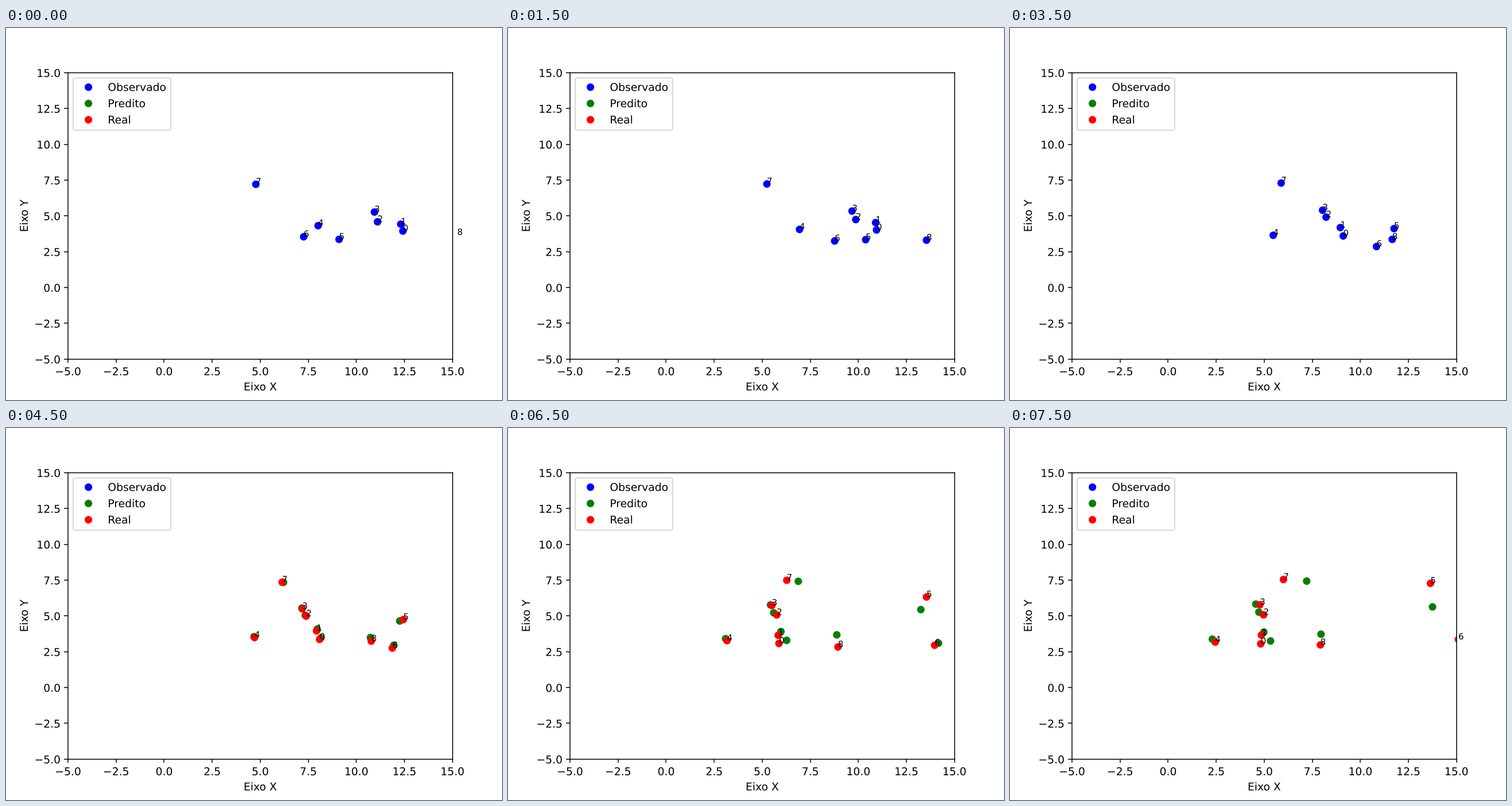
Recreate the animation shown at these times as a matplotlib script. Size 864 by 648 pixels, loop 8000 ms.

```python
import numpy as np
import matplotlib.pyplot as plt
from matplotlib.animation import FuncAnimation
from matplotlib.patheffects import Normal

# Drawing everything as paths keeps text and markers at sub-pixel positions.
plt.rcParams["path.effects"] = [Normal()]

FRAMES, INTERVAL = 16, 500
LAST_SEEN, LAST = 7, FRAMES - 1
KEY_TIMES = (0, 3, LAST_SEEN, 11, LAST)

# Per agent, in stage pixels: the walk at KEY_TIMES, then where the forecast ends.
AGENTS = np.array([
    [(691.3, 353.7), (642, 351.8), (580.4, 362.3), (509.6, 372.7), (436.7, 376), (453.8, 371)],
    [(687.6, 341.7), (640.3, 339), (575.4, 347.6), (505.6, 358.3), (438, 360.8), (442.2, 355.6)],
    [(647.2, 337.6), (605.8, 333.7), (550.6, 329.4), (495.3, 326.4), (441.7, 325.5), (433.5, 320.8)],
    [(641.8, 320.6), (599.3, 318.9), (544.5, 317.4), (487.3, 312), (435.2, 308), (428.2, 306.8)],
    [(543.7, 344.3), (507.8, 350.8), (458.5, 361.1), (407, 368), (357.5, 373), (352.5, 367.8)],
    [(580.2, 368.2), (623, 368.8), (669, 349.4), (713.4, 315.4), (732.4, 270.6), (736, 311.6)],
    [(518.5, 363.7), (569, 371), (638.4, 380.7), (707.6, 383), (781, 368.3), (787, 374)],
    [(435.2, 272.2), (451, 271.7), (472.3, 270.1), (486.2, 267), (476.3, 263.9), (516.8, 266.7)],
    [(786, 360.5), (729, 369.6), (665.8, 368.2), (606.3, 377), (540.7, 377.8), (541.7, 359.2)],
])
WALK, FORECAST_END = AGENTS[:, :-1], AGENTS[:, -1]


def walk(t):
    """Polynomial path through each agent's key points."""
    weights = [np.prod([(t - b) / (a - b) for b in KEY_TIMES if b != a])
               for a in KEY_TIMES]
    return np.einsum("k,akc->ac", weights, WALK)


def forecast(t):
    """Steady in x from the last seen point, with the y drift easing out."""
    s = (t - LAST_SEEN) / (LAST - LAST_SEEN)
    start = walk(LAST_SEEN)
    return start + (FORECAST_END - start) * (s, 1 - (1 - s) ** 1.5)


fig, ax = plt.subplots(figsize=(6.4, 4.8), dpi=135)
ax.set(xlim=(-5, 15), ylim=(-5, 15), xlabel="Eixo X", ylabel="Eixo Y")
observed, predicted, real = (
    ax.plot([], [], "o", color=color, label=name)[0]
    for name, color in (("Observado", "blue"), ("Predito", "green"), ("Real", "red")))
ax.legend(loc="upper left")
labels = [ax.text(0, 0, str(n), fontsize=8) for n in range(len(AGENTS))]


def to_data(points):
    left, top = 108, 77.76
    width, height = 669.6, 498.96
    return -5 + 20 * (points[:, 0] - left) / width, 15 - 20 * (points[:, 1] - top) / height


def update(frame):
    for dots in (observed, predicted, real):
        dots.set_data([], [])
    x, y = to_data(walk(frame))
    if frame <= LAST_SEEN:
        observed.set_data(x, y)
    else:
        predicted.set_data(*to_data(forecast(frame)))
        real.set_data(x, y)
    for label, position in zip(labels, zip(x, y)):
        label.set_position(position)
    return observed, predicted, real, *labels


anim = FuncAnimation(fig, update, frames=FRAMES, interval=INTERVAL,
                     repeat=True, repeat_delay=0, blit=False)
plt.show()
```
